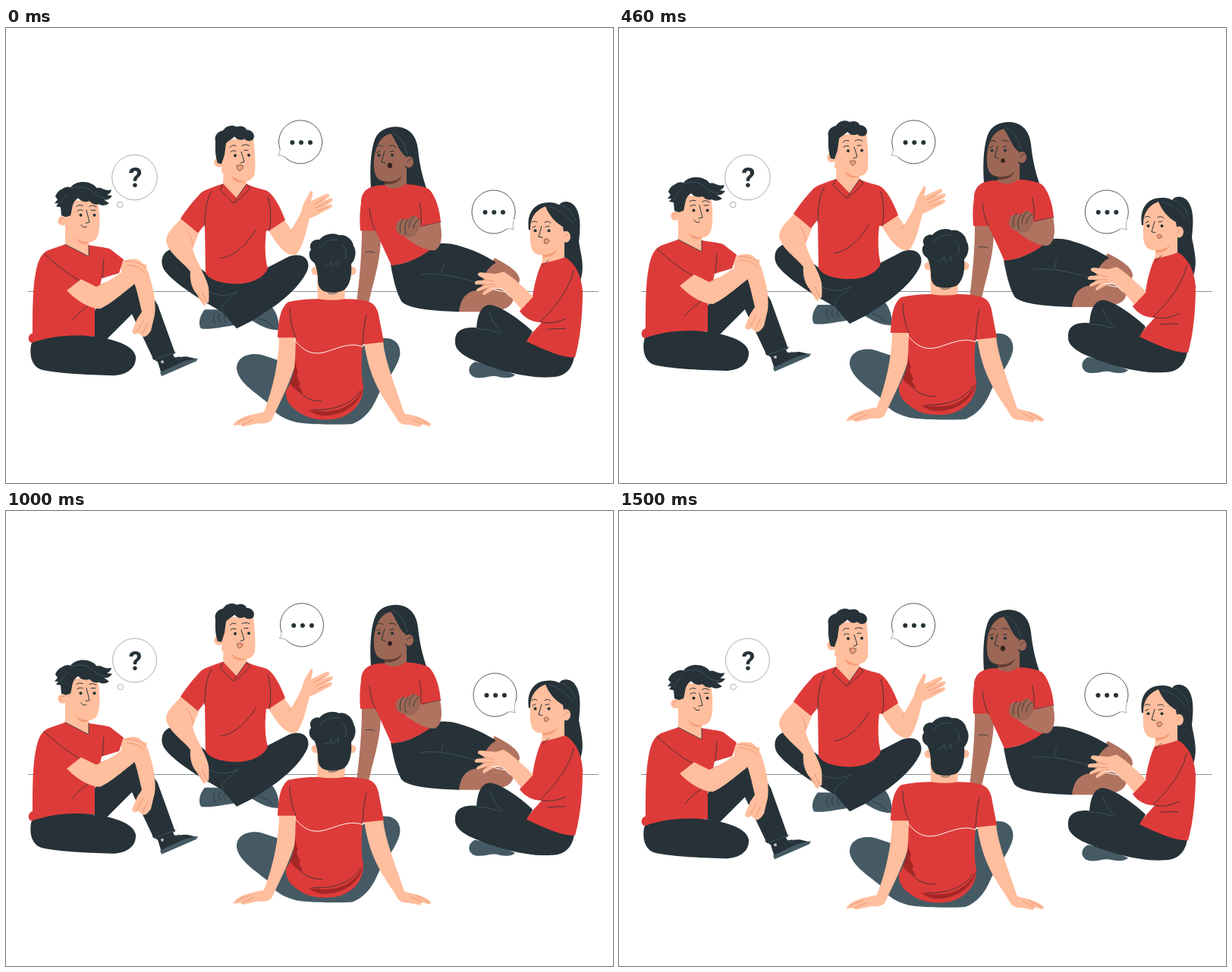
Animation, 800 px wide and 600 px high, one loop 1.54 s. Source, as an HTML page:

```html
<!DOCTYPE html>
<html lang="en">
<head>
<meta charset="utf-8">
<title>Group talk</title>
<style>
html,body{margin:0;width:100%;height:100%;overflow:hidden;background:#fff}
svg{display:block;width:100vw;height:100vh}
.red{fill:#dd3b39}.deep{fill:#a42726}.dark{fill:#263238}.slate{fill:#455a64}
.skin{fill:#ffbe9d}.blush{fill:#f59b75}
.brown{fill:#b07360}.face{fill:#9d6755}
.ln,.thin,.gray,.white{fill:none;stroke:#263238;stroke-width:.8;stroke-linecap:round;stroke-linejoin:round}
.ln{stroke-width:1}.gray{stroke:#455a64}.white{stroke:#fff;stroke-width:1}
.tone{fill:none;stroke:#e58f6c;stroke-width:.8;stroke-linecap:round}
.bub{fill:#fff;stroke:#263238;stroke-width:.8}
.faint{fill:#fff;stroke:#263238;stroke-width:.4}
text{font:700 36px Roboto,Inter,sans-serif;text-anchor:middle;fill:#263238}
</style>
</head>
<body>
<svg viewBox="0 0 800 600">
<path d="M29 347.5H781" stroke="#263238" stroke-width=".55"/>
<g id="people">

<g id="leaner">
  <path class="dark" d="M481 211C479 185 481 160 486 147C491 134 503 130 515 130C531 131 541 141 543 160C545 180 549 196 554 211L534 213L481 211Z"/>
  <path class="brown" d="M469 264H493C496 290 490 315 482 345L478 362H462C466 330 469 300 469 264Z"/>
  <path class="brown" d="M644 303C662 312 677 322 677 332C676 340 670 344 666 347C670 352 669 357 668 360C664 370 650 374 630 374H596L600 350L626 330Z"/>
  <path class="white" d="M638 343Q654 349 668 348"/>
  <path class="dark" d="M507 312C530 312 548 300 558 290C568 282 580 283 594 286C616 292 634 301 646 309Q634 316 630 328L626 345C612 346 600 350 597 374C570 373 530 371 521 360C513 345 510 328 507 312Z"/>
  <path class="gray" d="M547 325Q566 320 620 335M574 322Q574 316 578 312"/>
  <path class="face" d="M499 190V213L528 214V184Z"/>
  <path class="red" d="M498 207C480 207 468 213 468 230C466 243 466 255 467 267H487L508 313C530 311 550 300 562 290L547 262L573 256C572 240 566 220 557 212C547 207 535 206 526 206C518 213 506 213 498 207Z"/>
  <path class="thin" d="M487 267C482 258 480 247 479 237M547 259C548 246 546 236 545 230M548 261L573 256"/>
  <path class="brown" d="M547 262L572 256C576 275 574 289 565 293C552 294 538 284 526 276L538 264Z"/>
  <path class="face" d="M514 265C513 254 520 250 528 252L537 247Q541 247 542 250Q546 250 546 255V262L540 273Q533 278 524 274Q516 272 514 265Z"/>
  <path class="thin" d="M520 269Q517 259 524 251M527 272Q523 260 530 252M531 263Q532 252 538 248M537 264Q538 255 545 251"/>
  <path class="face" d="M507 139C495 142 487 153 485 174C484 192 488 201 499 202C510 203 523 200 526 190L527 169C518 164 515 149 507 139Z"/>
  <ellipse class="face" cx="531" cy="176.500" rx="6" ry="7.500"/>
  <path class="thin" d="M529 177Q530 172 534 173"/>
  <path d="M499 202Q516 203 522 194Q518 207 499 206Z" fill="#643e34"/>
  <path class="ln" d="M488 156Q492 153 497 156M505 155Q511 153 514 157M489 164L493 162M506 163L511 162M499 162L495 176L500 178"/>
  <circle class="dark" cx="491.500" cy="167.500" r="2"/><circle class="dark" cx="509" cy="167.500" r="2"/>
  <ellipse class="talk" data-c="506 181" cx="506" cy="181" rx="3.200" ry="3.500" fill="#35221e"/>
  <path class="gray" d="M510 138Q525 145 529 166"/>
  <path class="thin" d="M474 295Q482 294 486 296"/>
</g>

<g id="talker">
  <path class="slate" d="M262 371C255 379 253 390 257 396C268 398 285 394 305 391L284 371Z"/>
  <path class="slate" d="M322 384L350 367C357 375 361 388 359 398C345 398 334 392 322 384Z"/>
  <path class="thin" d="M275 377Q271 383 276 390M282 377Q278 383 283 388M289 378Q285 383 290 388M334 383Q344 385 352 394"/>
  <path class="dark" d="M222 290L263 322C285 336 325 338 344 316L373 301C395 294 403 309 396 322C386 342 366 357 356 365L326 385L304 396L285 374C255 358 215 332 207 316C202 303 209 292 222 290Z"/>
  <path class="gray" d="M306 347L284 367L286 373M263 345Q285 359 306 347"/>
  <path class="skin" d="M345 266L366 252L376 266C383 254 388 246 390 239C392 229 398 222 401 215Q405 213 404 219L402 228L421 219Q427 217 426 222L417 228L428 224Q433 225 429 229L420 234L428 232Q432 233 428 237C420 241 410 247 400 251C395 270 391 290 382 299C365 301 355 280 345 266Z"/>
  <path class="tone" d="M405 233L421 224M408 237L426 229M411 241L424 236M376 266L373 270"/>
  <path class="skin" d="M234 247C224 260 211 268 211 281C214 297 235 310 243 321C242 333 245 343 251 350L259 364Q263 368 264 362L267 362Q268 354 267 342C263 325 249 305 246 291L255 268Z"/>
  <path class="tone" d="M253 350L260 361M258 347L264 360M238 267Q245 273 246 287"/>
  <path class="skin" d="M287 175L286 207L304 226L317 207V195Z"/>
  <path class="red" d="M286 205C270 211 261 213 256 218C245 230 237 240 230 251L253 270L262 259L263 323C270 334 290 338 310 337C328 335 341 327 345 317C341 303 341 285 343 267H347L368 253C361 235 353 219 343 214C334 211 325 210 317 205L304 224Z"/>
  <path class="thin" d="M262 262C262 240 265 224 271 215M347 267C350 252 349 236 345 222M283 303C302 301 319 283 329 266M286 206L282 213L300 231L304 224M304 224L317 206L322 211L303 230"/>
  <path class="skin" d="M286 147L326 145C328 160 329 180 328 191C326 202 314 204 301 201L284 190Z"/>
  <circle class="skin" cx="280.500" cy="177" r="6.300"/>
  <path class="tone" d="M278 178Q277 172 282 174"/>
  <path class="blush" d="M297 194Q304 201 316 202Q309 205 301 201Z"/>
  <path class="dark" d="M279 178C275 166 276 157 276 149C274 142 279 136 286 135C290 128 299 127 304 130C310 128 316 130 317 134C325 134 329 141 326 146C323 150 317 149 314 146C308 149 304 146 301 143C297 147 292 149 290 152L288 167L284 179Z"/>
  <path class="ln" d="M295 157Q298 153 303 155M311 155Q316 152 321 155M296 163Q299 160 303 162M314 161L319 161M310 163L314 176L309 178"/>
  <circle class="dark" cx="302" cy="168" r="2"/><circle class="dark" cx="320" cy="167.500" r="2"/>
  <path class="talk blush" data-c="308 183.500" d="M304 181Q309 180 312 181Q314 185 308 188Q304 187 304 181Z" stroke="#263238" stroke-width=".6"/>
</g>

<g id="thinker">
  <path class="dark" d="M114 406L117 372L150 335H182L200 365L223 429L195 438L166 377L132 411Z"/>
  <path class="dark" d="M192 435L200 440L205 456L251 436L238 433L222 434L219 428Z"/>
  <path class="slate" d="M253 435L251 439L205 459L203 454L235 439Z"/>
  <circle cx="206" cy="440" r="2" fill="#b8c0c4"/>
  <path class="gray" d="M196 437L224 427M222 434L229 438M227 433L233 437"/>
  <path class="skin" d="M78 240V287L109 303V281L90 240Z"/>
  <path class="red" d="M78 285L109 301V286C120 288 131 289 137 291L155 305L149 323L126 330L117 373V406L35 413C29 412 29 405 35 403C35 380 35 348 38 329C41 310 44 299 55 293Z"/>
  <path class="thin" d="M50 297Q73 319 99 334M129 304L127 329M117 361Q100 370 87 386M78 285L109 301L109 286"/>
  <path class="skin" d="M99 331L80 346C94 360 110 370 124 370C140 363 160 344 179 330L186 312L158 306Q150 311 152 322C140 331 128 337 119 341Z"/>
  <path class="skin" d="M155 307Q166 302 176 306Q187 315 190 330C195 346 198 363 196 378L191 399Q185 408 181 407L174 402Q168 406 166 400L173 383L179 374C175 357 172 342 167 331Q153 331 152 318Z"/>
  <path class="tone" d="M155 307Q177 307 184 316M160 312Q178 314 182 322M119 341L130 336M173 400L181 385M180 403L187 389"/>
  <circle cx="174.500" cy="404" r="1.500" fill="#fff"/>
  <path class="dark" d="M33 418C36 405 68 404 94 405C130 406 168 415 171 433C172 449 158 458 140 458C104 457 64 455 46 450C33 445 31 430 33 418Z"/>
  <path class="red" d="M36 402C28 403 28 414 34 415C50 409 70 405 98 405L110 398Z"/>
  <path class="skin" d="M80 226L121 229C124 245 124 260 122 270C120 281 112 284 102 282L80 268Z"/>
  <circle class="skin" cx="74.500" cy="254" r="6.200"/>
  <path class="tone" d="M72 256Q70 249 76 251"/>
  <path class="blush" d="M91 275Q98 283 110 282Q104 287 96 282Z"/>
  <path class="dark" d="M73 247L72 236L66 235L69 231L64 231L68 226L65 222Q67 215 74 212Q79 208 85 210C92 201 107 201 116 207L120 211C125 208 129 216 139 213Q138 218 133 220L140 221Q135 228 129 226L136 231Q129 236 122 232Q116 234 110 228Q101 231 95 224C86 230 88 237 85 247L79 249Z"/>
  <path class="gray" d="M85 211Q104 206 113 215T132 224M72 231Q77 222 82 219"/>
  <path class="ln" d="M93 235Q96 232 101 234M110 235Q115 232 119 236M94 241Q97 238 101 240M112 240L118 240M106 240L110 256L105 257M99 259Q101 264 106 262"/>
  <circle class="dark" cx="98.500" cy="246.500" r="2"/><circle class="dark" cx="116.500" cy="246.500" r="2"/>
</g>

<g id="listener">
  <path class="slate" d="M618 440C608 445 608 456 617 460C628 464 640 456 650 460C660 462 668 461 671 457L640 444Z"/>
  <path class="dark" d="M620 400C620 380 626 366 636 365C651 364 683 389 694 400L686 414Z"/>
  <path class="dark" d="M592 412C592 397 605 394 620 395C642 397 662 405 688 411L749 433C747 445 741 456 728 459C695 465 645 451 610 435C597 428 591 421 592 412Z"/>
  <path class="gray" d="M637 375Q642 391 654 402M619 396Q635 397 651 402"/>
  <path class="dark" d="M689 266C686 247 694 231 713 230Q722 229 729 233C733 227 744 227 750 235C758 246 757 264 755 282C758 300 763 314 757 333C747 326 737 312 735 300L736 270Z"/>
  <path class="skin" d="M708 290L706 313L736 304V278Z"/>
  <path class="red" d="M706 310Q720 308 737 302C751 311 758 325 760 347C760 377 757 410 750 434C735 435 713 426 686 413C692 402 701 394 706 388C694 388 683 382 677 373L694 353C696 340 700 322 706 310Z"/>
  <path class="thin" d="M748 319C745 339 724 369 704 387M706 388Q722 391 738 383M714 397Q726 396 737 396M707 314L715 306"/>
  <path class="skin" d="M695 354L679 371C669 358 662 351 655 345C645 341 638 348 630 352Q627 352 629 348L636 342L622 347Q618 346 622 343L632 338L619 338Q616 336 620 333L633 332L622 326Q621 322 626 322L645 324L656 321C668 328 681 341 695 354Z"/>
  <path class="tone" d="M633 332L643 334M632 338L644 338M636 342L646 341"/>
  <path class="white" d="M639 343Q646 341 655 345L664 354"/>
  <path class="skin" d="M711 235C698 240 690 250 691 268C690 286 692 299 705 299C720 301 733 290 736 275L734 262C722 255 715 245 711 235Z"/>
  <ellipse class="skin" cx="738" cy="275" rx="6" ry="7.500"/>
  <path class="tone" d="M736 276Q737 271 741 272"/>
  <path class="blush" d="M707 299Q719 299 727 292Q721 303 707 302Z"/>
  <path class="gray" d="M715 235Q731 238 747 257M730 233Q745 236 750 253"/>
  <path class="ln" d="M693 256Q697 253 700 256M710 256Q715 253 718 257M694 263L698 261M711 262L716 261M706 261L702 275L707 276"/>
  <circle class="dark" cx="697.500" cy="267" r="2"/><circle class="dark" cx="715.500" cy="267" r="2"/>
  <path class="talk blush" data-c="712 281" d="M709 279Q713 276 716 280Q715 285 710 284Z" stroke="#263238" stroke-width=".6"/>
</g>

<g id="front">
  <path class="slate" d="M304 449C304 432 322 427 338 431L380 445L400 500L465 480L469 420L495 409C515 407 521 420 519 432C515 450 497 470 490 485C482 505 470 517 456 522C440 523 395 523 380 519C365 515 352 507 345 494C325 478 306 466 304 449Z"/>
  <circle class="skin" cx="408" cy="320" r="5.500"/><circle class="skin" cx="456" cy="320" r="5.500"/>
  <path class="skin" d="M410 325L411 361H446L448 325Z"/>
  <path class="skin" d="M360 405H382L383 437C376 465 362 491 350 517Q345 522 333 521L313 525Q309 526 311 523L301 524Q298 523 303 519C314 510 328 509 340 506C352 475 360 438 360 405Z"/>
  <path class="skin" d="M472 415L497 412C499 438 513 472 525 508C536 511 548 512 559 521Q562 524 557 525L548 522L546 526L531 523Q519 524 515 515C501 491 480 470 472 415Z"/>
  <path class="tone" d="M311 523L326 516M304 520L321 513M548 522L533 515M557 522L540 513"/>
  <path class="red" d="M372 361Q390 357 411 357Q430 360 447 357Q466 357 479 361C488 365 491 374 492 383L498 414L470 417C468 440 468 460 471 472C471 490 463 505 440 514C420 519 398 516 384 505C372 497 368 488 369 478C376 468 380 455 381 440L382 408H358C359 390 360 370 372 361Z"/>
  <path class="deep" d="M381 435Q382 446 385 453L383 457L388 469L386 471L392 482Q379 477 374 468Q381 455 381 435Z"/>
  <path class="deep" d="M398 503C430 509 456 499 471 474C465 500 440 512 416 511Q405 509 398 503Z"/>
  <path class="red" d="M404 502Q448 504 470 474L467 481Q450 507 415 505Z"/>
  <path class="thin" d="M382 408C376 394 374 380 374 369M470 417C471 402 472 390 475 378M385 478Q397 493 417 492M405 503Q449 505 467 478"/>
  <path class="white" d="M380 411C394 428 405 431 421 427C440 421 454 414 470 420"/>
  <path class="dark" d="M411 328C410 318 408 312 406 309C399 305 398 296 402 292C398 285 405 277 413 279C419 271 432 269 439 273C448 271 457 279 458 287C463 295 460 306 455 311C456 325 454 338 446 345C438 350 422 350 416 345C411 341 411 334 411 328Z"/>
  <path class="gray" d="M413 290Q421 277 437 279M419 314Q426 313 429 307Q427 316 432 313L438 306L437 314M443 285Q451 293 447 304"/>
  <path class="thin" d="M425 350Q431 352 436 349"/>
</g>
</g>

<g id="ask">
  <circle class="faint" cx="169.500" cy="197" r="29.800"/>
  <circle class="faint" cx="150.300" cy="233" r="3.800"/>
  <text x="170.500" y="210">?</text>
</g>
<g class="chat">
  <path class="faint" d="M361 160Q361.500 165 358.500 168Q363 167 367.500 170"/>
  <path class="bub" d="M361.300 160A28.500 28.500 0 1 1 367.500 170"/>
  <g class="dark"><circle cx="377.300" cy="151" r="3"/><circle cx="389" cy="151" r="3"/><circle cx="401" cy="151" r="3"/></g>
</g>
<g class="chat">
  <path class="faint" d="M669.400 252Q667 261 669 266Q665 264 660 265"/>
  <path class="bub" d="M669.400 252A28.500 28.500 0 1 0 660 265"/>
  <g class="dark"><circle cx="631.500" cy="243" r="3"/><circle cx="643.200" cy="243" r="3"/><circle cx="655" cy="243" r="3"/></g>
</g>
</svg>
<script>
const LOOP = 1540, LIFT = 4.5, BASE = .3, TOP = 738;
const people = document.getElementById('people');
const ask = document.getElementById('ask');
const chats = document.querySelectorAll('.chat');
const mouths = document.querySelectorAll('.talk');

// [time, value] keys
const slide = [[0, 0], [180, -.9], [330, -.7], [630, 1.6], [850, 4.2], [1130, .1], [1310, -1], [1540, 0]];
const shrink = [[0, 1], [560, 1], [860, .972], [1500, .972], [1540, 1]];

function at(keys, t) {
  const i = Math.max(1, keys.findIndex(k => k[0] >= t));
  const [t0, a] = keys[i - 1], [t1, b] = keys[i];
  const u = (t - t0) / (t1 - t0);
  return a + (b - a) * u * u * (3 - 2 * u);
}

function move(el, x, y) {
  el.setAttribute('transform', `translate(${x} ${y})`);
}

function zoom(el, x, y, s) {
  el.setAttribute('transform', `translate(${x} ${y}) scale(${s}) translate(${-x} ${-y})`);
}

function draw(t) {
  const wave = Math.cos((t - TOP) / LOOP * 2 * Math.PI);
  move(people, 0, BASE - LIFT * (1 + wave));
  zoom(ask, 169.5, 197, at(shrink, t));
  const x = at(slide, t);
  chats.forEach(c => move(c, x, 0));
  const open = .92 + .08 * Math.cos(t / LOOP * 4 * Math.PI);
  mouths.forEach(m => zoom(m, ...m.dataset.c.split(' ').map(Number), open));
}

function tick(now) {
  draw(now % LOOP);
  requestAnimationFrame(tick);
}
draw(0);
requestAnimationFrame(tick);
</script>
</body>
</html>
```
